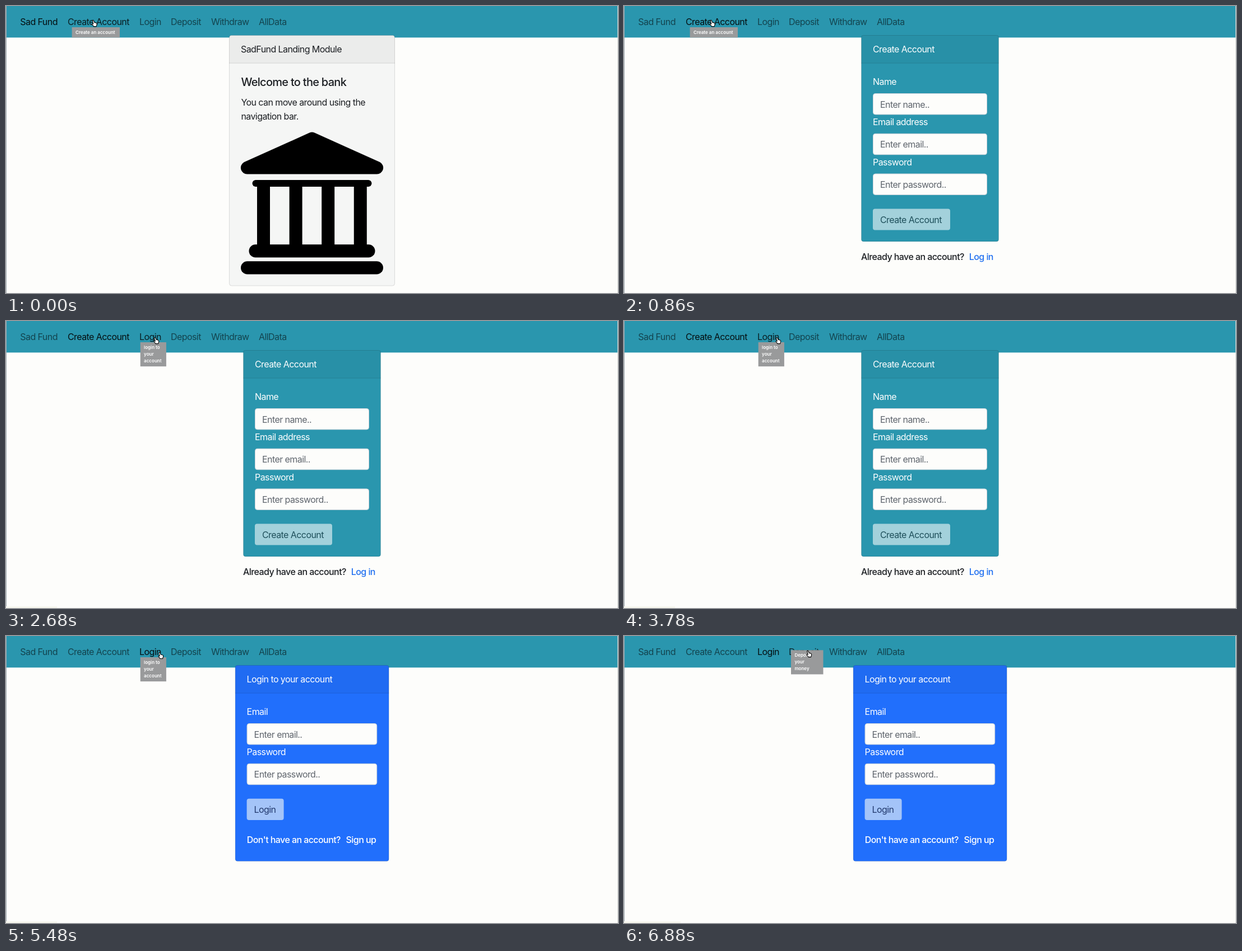
Animation of 1092x513 px, one loop 8 s. Source, as an HTML page:

```html
<!DOCTYPE html>
<html lang="en">
<head>
<meta charset="utf-8">
<title>Bank demo</title>
<style>
  html, body { margin: 0; width: 100%; height: 100%; overflow: hidden; background: #fdfdfb; }
  svg { display: block; width: 1092px; height: 513px; }
  text { font: 400 16px Inter, Roboto, "Liberation Sans", sans-serif; letter-spacing: -.036em; white-space: pre; }
  text.medium { font-weight: 500; }
  text.title { font-size: 20px; font-weight: 500; }
  text.tip { font-size: 8px; font-weight: 600; letter-spacing: 0; }
</style>
</head>
<body>
<svg id="stage" viewBox="0 0 1092 513"></svg>
<script>
const LOOP = 8000;
const TEAL = '#2a96ae', BLUE = '#216ffc', PAPER = '#fdfdfb', INK = '#1b1e22';

// Times of the page changes and of the pointer crossing between links
const T = { create: 840, toLogin: 1980, login: 3820, toDeposit: 5680 };

const rect = (x, y, w, h, fill, r = 0, extra = '') =>
  `<rect x="${x}" y="${y}" width="${w}" height="${h}" rx="${r}" fill="${fill}" ${extra}/>`;
const text = (x, y, str, fill = '#fff', cls = '') =>
  `<text x="${x}" y="${y}" fill="${fill}" class="${cls}">${str}</text>`;
const group = (id, body) => `<g id="${id}">${body}</g>`;

function card(x, w, h, fill, heading, color) {
  return rect(x + .5, 52.5, w - 1, h - 1, fill, 4, 'stroke="#000" stroke-opacity=".12"') +
    `<path d="M${x} 102V56q0-4 4-4H${x + w - 4}q4 0 4 4V102Z" fill-opacity=".04"/>` +
    rect(x, 101.6, w, 1, '#000', 0, 'fill-opacity=".13"') +
    text(x + 21, 83.4, heading, color);
}

function field(x, y, w, label, hint) {
  return text(x, y - 14.6, label) +
    rect(x + .5, y + .5, w - 1, 37.4, PAPER, 4, 'stroke="#ced4da"') +
    text(x + 13, y + 25.5, hint, '#5f656d');
}

const button = (x, y, w, label, fill, color) =>
  rect(x, y, w, 38.2, fill, 4) + text(x + 13, y + 25.3, label, color);

function bankIcon() {
  const columns = [0, 1, 2, 3].map(i => rect(448 + i * 57.6, 320, 23, 110, '#000')).join('');
  return '<path d="M430.5 300.5H661.5A11.4 11.4 0 0 0 667 279L550.5 226.6Q546 224.6 541.5 226.6L425 279A11.4 11.4 0 0 0 430.5 300.5Z"/>' +
    rect(439.5, 311, 213, 12, '#000', 6) + columns +
    rect(433.5, 426.3, 225, 23.2, '#000', 11.6) +
    rect(419, 456.3, 254, 23.2, '#000', 11.6);
}

function tip(id, x, y, w, lines) {
  const h = 6 + lines.length * 12.4;
  return group(id, rect(x, y, w, h, '#999a9b') +
    lines.map((s, i) => text(x + 6.4, y + 11.5 + i * 12.3, s, '#fff', 'tip')).join(''));
}

const links = [
  ['home', 25.3, 'Sad Fund'], ['signup', 110, 'Create Account'], ['login', 238, 'Login'],
  ['deposit', 294, 'Deposit'], ['withdraw', 366, 'Withdraw'], ['data', 451, 'AllData']
];

const landing = card(398, 296, 448.5, '#f5f6f5', 'SadFund Landing Module', INK) +
  text(419.4, 142.5, 'Welcome to the bank', INK, 'title') +
  text(419.4, 178.4, 'You can move around using the', INK) +
  text(419.4, 203.3, 'navigation bar.', INK) + bankIcon();

const signupForm = card(423, 246, 369.5, TEAL, 'Create Account') +
  field(444, 156, 204, 'Name', 'Enter name..') +
  field(444, 227.8, 204, 'Email address', 'Enter email..') +
  field(444, 299.5, 204, 'Password', 'Enter password..') +
  button(444, 362.4, 138, 'Create Account', '#a3d1db', '#1e4f5a') +
  text(423, 453.9, 'Already have an account?', INK, 'medium') +
  text(615.8, 453.9, 'Log in', '#1f6ff0', 'medium');

const loginForm = card(408.6, 275, 351, BLUE, 'Login to your account') +
  field(429.6, 156, 232.6, 'Email', 'Enter email..') +
  field(429.6, 227.8, 232.6, 'Password', 'Enter password..') +
  button(429.6, 290.8, 66, 'Login', '#a4c4f8', '#21386c') +
  text(429.8, 369.7, "Don't have an account?", '#fff', 'medium') +
  text(606.6, 369.7, 'Sign up', '#fff', 'medium');

const stage = document.getElementById('stage');
stage.innerHTML = rect(0, 0, 1092, 513, PAPER) + rect(0, 0, 1092, 56.4, TEAL) +
  rect(0, 0, 1, 513, '#a3adb3') + rect(1091, 0, 1, 513, '#d9dcd8') +
  links.map(([id, x, label]) => group('nav-' + id, text(x, 33.7, label, '#000'))).join('') +
  group('landing', landing) + group('signupForm', signupForm) + group('loginForm', loginForm) +
  tip('tipSignup', 117.6, 38, 85.4, ['Create an account']) +
  tip('tipLogin', 239.7, 38, 46.2, ['login to', 'your', 'account']) +
  tip('tipDeposit', 298, 25.3, 57.5, ['Deposit', 'your', 'money']) +
  `<rect id="status" y="510" height="3" fill="#f7f7ef"/>` +
  `<path id="hand" d="M-3.4-4.8Q-2.4-6.4-1.2-5L.2-1.6 3-1.1Q4.6-.6 4.7 1L4.3 3.4 3.6 5.6H-.8L-3.9 2Q-4.5.6-3 .5L-1.7 1.2Z" fill="#fff" stroke="#000" stroke-width="1.1" stroke-linejoin="round"/>`;

const parts = {};
stage.querySelectorAll('[id]').forEach(el => parts[el.id] = el);

const path = [
  [0, 157.5, 31], [1500, 157.5, 31], [2300, 268, 35], [2900, 268, 35], [3400, 275, 35],
  [5460, 275, 35], [5900, 295, 32], [6400, 330, 32], [LOOP, 330, 32]
];

function pointerAt(t) {
  const i = path.findIndex(k => k[0] > t);
  const a = path[i - 1], b = path[i], u = (t - a[0]) / (b[0] - a[0]);
  return [a[1] + (b[1] - a[1]) * u, a[2] + (b[2] - a[2]) * u];
}

const ramp = (t, start, length) => Math.min(1, Math.max(0, (t - start) / length));
const fade = (id, value) => parts[id].setAttribute('opacity', value);
const show = (id, on) => parts[id].setAttribute('display', on ? 'inline' : 'none');

function draw(t) {
  const onSignup = t >= T.create && t < T.login;
  show('landing', t < T.create);
  show('signupForm', onSignup);
  show('loginForm', t >= T.login);

  const toLogin = ramp(t, T.toLogin, 300), toDeposit = ramp(t, T.toDeposit, 300);
  fade('tipSignup', 1 - toLogin);
  fade('tipLogin', toLogin * (1 - toDeposit));
  fade('tipDeposit', toDeposit);

  const lit = {
    home: t < T.create ? .9 : .55,
    signup: onSignup ? .9 : t < T.create ? .8 : .55,
    login: t >= T.login ? .9 : .55 + .25 * ramp(t, T.toLogin, 150),
    deposit: .55 + .2 * ramp(t, T.toDeposit, 150)
  };
  for (const [id] of links) fade('nav-' + id, lit[id] || .55);

  show('status', t >= T.toLogin);
  parts.status.setAttribute('width', t < T.toDeposit ? 91 : 101);
  parts.hand.setAttribute('transform', `translate(${pointerAt(t)})`);
}

const start = performance.now();
function tick() {
  draw((performance.now() - start) % LOOP);
  requestAnimationFrame(tick);
}
tick();
</script>
</body>
</html>
```
